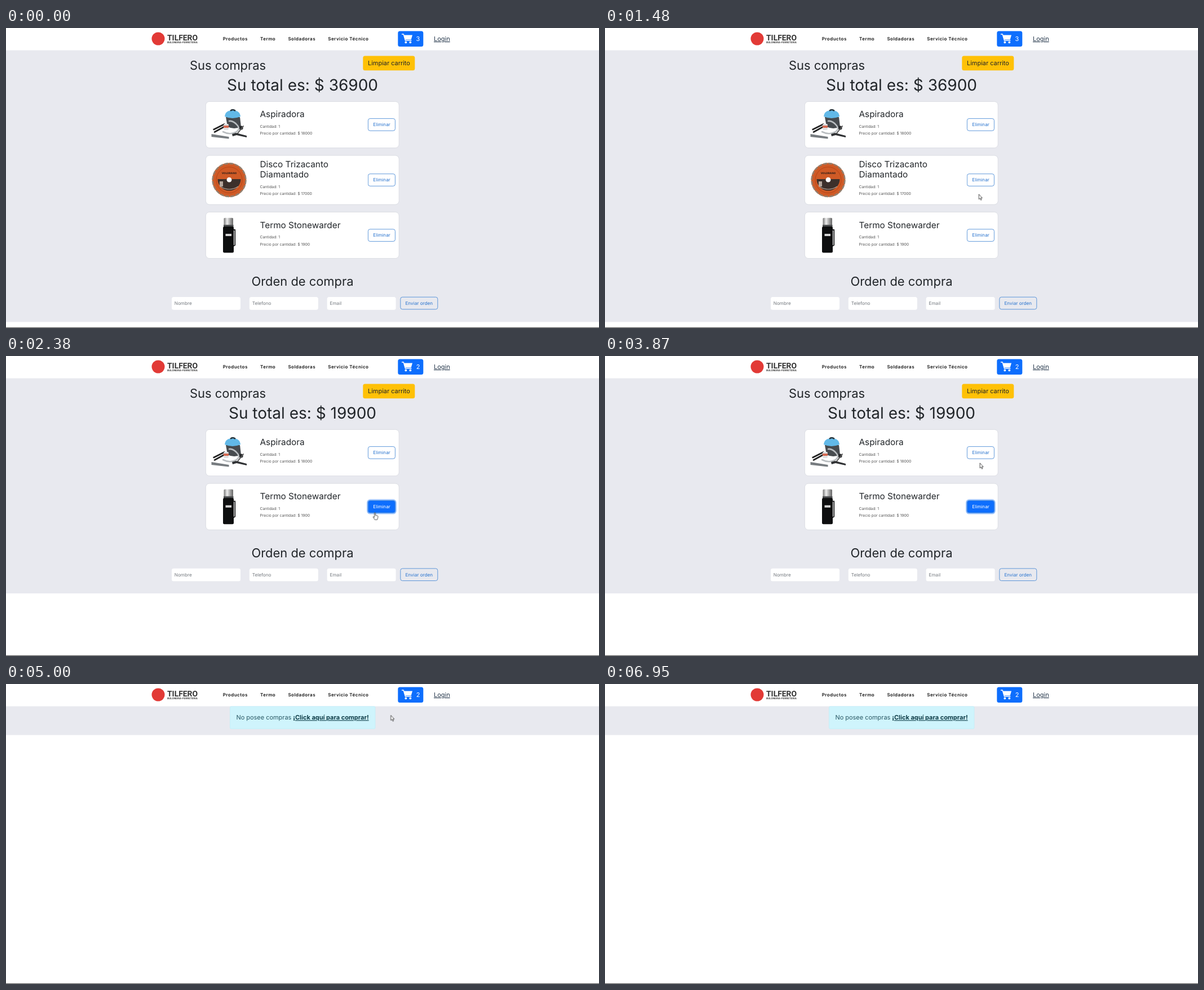
Animation of 1052x532 px, one loop 7790 ms. Source, as an HTML page:

```html
<!DOCTYPE html>
<html lang="es">
<head>
<meta charset="utf-8">
<title>Carrito de compras</title>
<style>
html, body { margin: 0; width: 100%; height: 100%; overflow: hidden; background: #fff; }
svg { display: block; width: 1052px; height: 532px; font-family: Inter, "Open Sans", sans-serif; text-rendering: geometricPrecision; fill: #212529; }

.logo { font: 700 13.9px Roboto, sans-serif; fill: #333; }
.sub { font: 700 4.7px Roboto, sans-serif; fill: #444; }
.nav { font-size: 8px; font-weight: 600; letter-spacing: .5px; fill: #111; }
.lg { font-size: 10.96px; }
.h1 { font-size: 21.92px; }
.total { font-size: 28px; }
.mid { text-anchor: middle; }
.h3 { font-size: 15.34px; }
.small { font-size: 6.8px; fill: #555; }
.hint { font-size: 8.2px; fill: #767b80; }
.box { fill: #fff; stroke: #d6d8df; stroke-width: .8; }
.input { fill: #fff; }
.btn rect { fill: #fff; stroke: #3a80d2; stroke-width: .8; }
.btn text { font-size: 8.2px; fill: #2a74cf; text-anchor: middle; }
.btn .ring, .ring { fill: none; stroke: #0d6efd; stroke-opacity: .5; stroke-width: 2.2; opacity: 0; }

/* one shared 7.79 s clock */
.t { animation: 7.79s step-end infinite; }
.full { animation-name: full; }
.fewer { animation-name: fewer; }
.cart { animation-name: cart; }
.empty { animation-name: empty; }
.lower { animation-name: rise; }
@keyframes full { 0% { visibility: visible } 30.552%, 100% { visibility: hidden } }
@keyframes fewer { 0% { visibility: hidden } 30.552%, 100% { visibility: visible } }
@keyframes cart { 0% { opacity: 1 } 64.185%, 100% { opacity: 0 } }
@keyframes empty { 0% { opacity: 0 } 64.185%, 100% { opacity: 1 } }
@keyframes rise { 0% { transform: none } 30.552%, 100% { transform: translateY(-100.3px) } }

.disc .face { animation: discFace 7.79s linear infinite; }
.disc .label { animation: discLabel 7.79s linear infinite; }
.disc .ring { animation-name: discRing; }
@keyframes discFace { 0%, 19.5% { fill: #fff } 21.053%, 100% { fill: #0d6efd } }
@keyframes discLabel { 0%, 19.5% { fill: #2a74cf } 21.053%, 100% { fill: #fff } }
@keyframes discRing { 0% { opacity: 0 } 28.498% { opacity: .3 } 29.525%, 100% { opacity: .6 } }

.flask .face { animation-name: flaskFace; }
.flask .label { animation-name: flaskLabel; }
.flask .ring { animation-name: flaskRing; }
@keyframes flaskFace { 0% { fill: #fff } 30.552% { fill: #0d6efd } 63.286%, 100% { fill: #97c1fb } }
@keyframes flaskLabel { 0% { fill: #2a74cf } 30.552% { fill: #fff } 63.286%, 100% { fill: #78abee } }
@keyframes flaskRing { 0% { opacity: 0 } 30.552% { opacity: 1 } 63.286%, 100% { opacity: 0 } }

.clear { fill: #ffc107; animation-name: clear; }
.clearRing { stroke: #d9a406; stroke-width: 1.4; animation-name: clearRing; }
@keyframes clear { 0% { fill: #ffc107 } 52.76%, 100% { fill: #ffca2c } }
@keyframes clearRing { 0% { opacity: 0 } 63.286%, 100% { opacity: 1 } }

.pointer { animation: seen 7.79s step-end infinite, move 7.79s step-end infinite; }
.arrow { animation-name: arrow; }
.hand { animation-name: hand; }
@keyframes seen { 0% { visibility: hidden } 2.696% { visibility: visible } 89.217%, 100% { visibility: hidden } }
@keyframes arrow { 0% { opacity: 1 } 20.026% { opacity: 0 } 48.652% { opacity: 1 } 52.76% { opacity: 0 } 64.185%, 100% { opacity: 1 } }
@keyframes hand { 0% { opacity: 0 } 20.026% { opacity: 1 } 48.652% { opacity: 0 } 52.76% { opacity: 1 } 64.185%, 100% { opacity: 0 } }
@keyframes move {
  0% { transform: translate(793px, 478px) }
  2.696% { transform: translate(793px, 478px); animation-timing-function: steps(3) }
  5.648% { transform: translate(803px, 486px) }
  8.858% { transform: translate(803px, 486px); animation-timing-function: steps(4) }
  12.965% { transform: translate(698.5px, 384.7px); animation-timing-function: steps(3) }
  15.918% { transform: translate(672px, 312px) }
  16.945% { transform: translate(672px, 312px); animation-timing-function: steps(4) }
  21.053% { transform: translate(654.5px, 277.5px) }
  47.625% { transform: translate(654.5px, 277.5px); animation-timing-function: steps(5) }
  52.76% { transform: translate(681px, 58px) }
  55.841% { transform: translate(682.7px, 55.5px) }
  77.022% { transform: translate(682.7px, 55.5px); animation-timing-function: steps(8) }
  85.109% { transform: translate(698px, 136px) }
  86.136% { transform: translate(698px, 136px); animation-timing-function: steps(3) }
  89.217%, 100% { transform: translate(715px, 480px) }
}
</style>
</head>
<body>
<svg viewBox="0 0 1052 532">
  <defs>
    <linearGradient id="steel">
      <stop offset="0" stop-color="#777"/><stop offset=".35" stop-color="#eee"/>
      <stop offset=".65" stop-color="#aaa"/><stop offset="1" stop-color="#666"/>
    </linearGradient>
  </defs>

  <!-- header -->
  <circle cx="270" cy="19" r="11.5" fill="#e23a36"/>
  <text class="logo" x="286" y="21.5">TILFERO</text>
  <text class="sub" x="286" y="27.3">BULONERIA-FERRETERIA</text>
  <g class="nav">
    <text x="384.7" y="22">Productos</text>
    <text x="451" y="22">Termo</text>
    <text x="500.4" y="22">Soldadoras</text>
    <text x="571.2" y="22">Servicio Técnico</text>
  </g>
  <rect x="695.3" y="5.5" width="45" height="27.5" rx="3.5" fill="#0d6efd"/>
  <path d="M702 11h3.2l3.2 11h11" fill="none" stroke="#fff" stroke-width="1.3"/>
  <path d="M705.3 12.6H721l-2.3 8h-11.2z" fill="#fff"/>
  <circle cx="709.3" cy="25.4" r="1.9" fill="#fff"/>
  <circle cx="717.3" cy="25.4" r="1.9" fill="#fff"/>
  <g class="lg mid" fill="#fff">
    <text class="t full" x="731" y="23">3</text>
    <text class="t fewer" x="731" y="23">2</text>
  </g>
  <text class="lg" x="759" y="23" fill="#24364a" text-decoration="underline">Login</text>

  <!-- cart -->
  <g class="t cart">
    <rect y="39.5" width="1052" height="282" fill="#e8e9ef"/>
    <text class="h1" x="326" y="74">Sus compras</text>
    <rect class="t clear" x="633.3" y="49.5" width="92" height="25.8" rx="3.5"/>
    <rect class="t ring clearRing" x="632.8" y="49" width="93" height="26.8" rx="4"/>
    <text class="lg" x="642" y="66.4">Limpiar carrito</text>
    <g class="total mid">
      <text class="t full" x="526" y="111">Su total es: $ 36900</text>
      <text class="t fewer" x="526" y="111">Su total es: $ 19900</text>
    </g>

    <g>
      <rect class="box" x="354.4" y="130.4" width="342.8" height="82.2" rx="6.5"/>
      <path d="M390 158h25l2 17q-12 6-24 0z" fill="#474b4f"/>
      <circle cx="417" cy="177" r="3.6" fill="#26282a"/>
      <path d="M388 157q1-11 14-11t14 11q-14 6-28 0z" fill="#62b9e8"/>
      <path d="M398 147q4-4 9 0" fill="none" stroke="#26343c" stroke-width="2.4"/>
      <g fill="none" stroke-linecap="round">
        <path d="M370 184.5l20-11M368.5 180l19-9.5" stroke="#222" stroke-width="2.6"/>
        <path d="M385 184q12 6 22 1t3-13-14-7" stroke="#b9bdc0" stroke-width="2.6"/>
        <path d="M421 174l-11 14" stroke="#555" stroke-width="2"/>
      </g>
      <rect x="386" y="170" width="9" height="11" rx="2" fill="#dfe1e2"/>
      <rect x="386" y="173" width="9" height="4" fill="#d46a52"/>
      <path d="M364.5 188l31 5v3.5l-31-3.5z" fill="#777c80"/>
      <path d="M401 188l7-2 19 5v3l-18-4-7 2z" fill="#303234"/>
      <text class="h3" x="450.5" y="158">Aspiradora</text>
      <text class="small" x="450.5" y="177">Cantidad: 1</text>
      <text class="small" x="450.5" y="189">Precio por cantidad: $ 18000</text>
      <g class="btn">
        <rect x="642.4" y="160.6" width="48" height="21.6" rx="3.5"/>
        <text x="666.6" y="174">Eliminar</text>
      </g>
    </g>

    <g class="t full">
      <rect class="box" x="354.4" y="226" width="342.8" height="87" rx="6.5"/>
      <circle cx="396" cy="269.5" r="30.3" fill="#cf5a26"/>
      <circle cx="396" cy="269.5" r="29.4" fill="none" stroke="#94806f" stroke-width="2.6" stroke-dasharray="7.2 2.04"/>
      <circle cx="396" cy="269.5" r="23" fill="none" stroke="#b84516" stroke-width="1"/>
      <path d="M375.5 268h41a20.5 20.5 0 0 1-41 0z" fill="#3c302b"/>
      <path d="M380 281q16 10 32 0" fill="none" stroke="#b9a79b" stroke-width="1.2"/>
      <rect x="379" y="272" width="6" height="9" fill="#b6a79d"/>
      <text class="mid" x="396" y="258.8" font-size="4.6" font-weight="800" fill="#33211a">VOLDRANO</text>
      <circle cx="396" cy="269.2" r="4.4" fill="#fff"/>
      <text class="h3" x="450.5" y="247.3">Disco Trizacanto</text>
      <text class="h3" x="450.5" y="265.4">Diamantado</text>
      <text class="small" x="450.5" y="284.3">Cantidad: 1</text>
      <text class="small" x="450.5" y="296.4">Precio por cantidad: $ 17000</text>
      <g class="btn disc">
        <rect class="t ring" x="641.3" y="257.6" width="50.2" height="23.8" rx="4.5"/>
        <rect class="face" x="642.4" y="258.7" width="48" height="21.6" rx="3.5"/>
        <text class="label" x="666.6" y="272.2">Eliminar</text>
      </g>
    </g>

    <g class="t lower">
      <rect y="320" width="1052" height="201.3" fill="#e8e9ef"/>
      <rect class="box" x="354.4" y="326.4" width="342.8" height="82.2" rx="6.5"/>
      <path d="M403 358h3.2v27l-3.2 2" fill="none" stroke="#18191a" stroke-width="1.8"/>
      <rect x="386.5" y="336.8" width="16.5" height="13" rx="1.5" fill="url(#steel)"/>
      <rect x="386" y="349" width="17.5" height="4" fill="#4b4d4f"/>
      <rect x="385" y="352" width="19" height="46.5" rx="2.5" fill="#0d0e0f"/>
      <rect x="389.5" y="365" width="10.5" height="4" fill="#d4d4d4"/>
      <text class="h3" x="450.5" y="354.5">Termo Stonewarder</text>
      <text class="small" x="450.5" y="373.3">Cantidad: 1</text>
      <text class="small" x="450.5" y="385.7">Precio por cantidad: $ 1900</text>
      <g class="btn flask">
        <rect class="t ring" x="641.3" y="355.7" width="50.2" height="23.8" rx="4.5"/>
        <rect class="t face" x="642.4" y="356.8" width="48" height="21.6" rx="3.5"/>
        <text class="t label" x="666.6" y="370.3">Eliminar</text>
      </g>

      <text class="h1 mid" x="526" y="457">Orden de compra</text>
      <rect class="input" x="294" y="477" width="122" height="22.8" rx="3.5"/>
      <rect class="input" x="431.8" y="477" width="122" height="22.8" rx="3.5"/>
      <rect class="input" x="569.6" y="477" width="122" height="22.8" rx="3.5"/>
      <text class="hint" x="298.8" y="491">Nombre</text>
      <text class="hint" x="436.8" y="491">Telefono</text>
      <text class="hint" x="574.5" y="491">Email</text>
      <g class="btn">
        <rect x="699.8" y="477.2" width="66" height="21.6" rx="3.5" style="fill:#e8e9ef"/>
        <text x="732.8" y="491">Enviar orden</text>
      </g>
    </g>
  </g>

  <!-- empty cart -->
  <g class="t empty">
    <rect y="39.5" width="1052" height="51" fill="#e8e9ef"/>
    <rect x="397.5" y="39.8" width="257.5" height="39.6" rx="2" fill="#cff4fc" stroke="#b9eef8" stroke-width=".6"/>
    <text class="lg" x="408.4" y="63.2" fill="#2b5a66">No posee compras</text>
    <text class="lg" x="509.3" y="63.2" font-weight="700" fill="#0b3b46" text-decoration="underline">¡Click aquí para comprar!</text>
  </g>

  <rect y="530.8" width="1052" height="1.2" fill="#626262"/>

  <g class="pointer" fill="#fff" stroke="#222" stroke-width=".8" stroke-linejoin="round">
    <path class="t arrow" d="M0 0v9l2-1.8 1.5 3.3 1.4-.7-1.4-3.1h2.6z"/>
    <path class="t hand" d="M-.9 8.6V1q.9-1.6 1.8 0v4l3.6.8q1 .3.9 1.4l-.6 3.4-.8 2.2H-.2L-3 8.7q-.6-1.6.9-1.2z"/>
  </g>
</svg>
</body>
</html>
```
